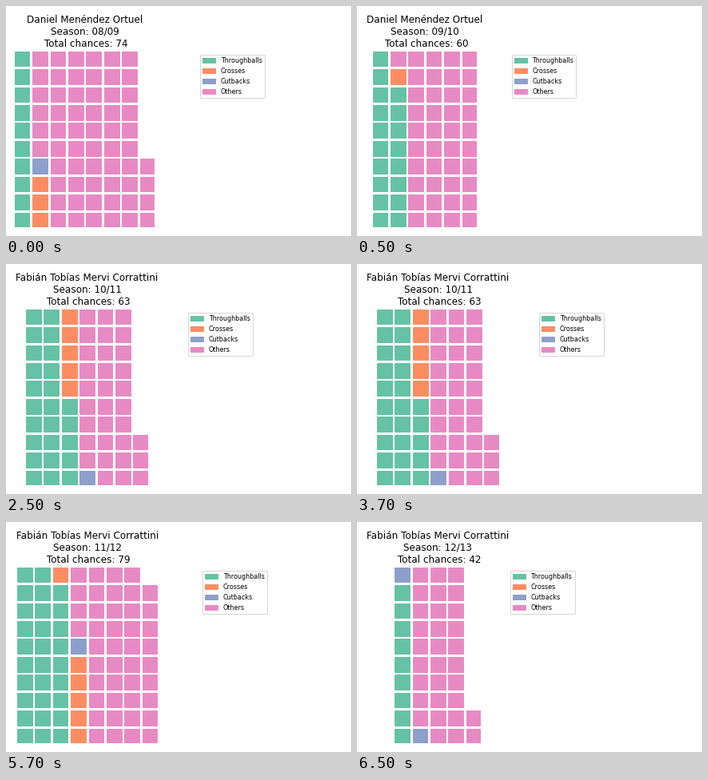
Recreate the animation shown at these times as a matplotlib script. Size 432x288 px, loop 8000 ms.

```python
import matplotlib.pyplot as plt
from matplotlib.animation import FuncAnimation
from matplotlib.patches import Patch, Rectangle

WIDTH, HEIGHT, DPI = 432, 288, 72
ROWS = 10
BLOCK = 18.678
PITCH = 1.2 * BLOCK
BOTTOM = 10.8

KINDS = ["Throughballs", "Crosses", "Cutbacks", "Others"]
COLORS = ["#66c2a5", "#fc8d62", "#8da0cb", "#e78ac3"]

FIRST = "Daniel Menéndez Ortuel"
SECOND = "Fabián Tobías Mervi Corrattini"

# player, season, chances of each kind, chart centre in px, steps on screen
SEASONS = [
    (FIRST, "08/09", (10, 3, 1, 60), 98.59, 1),
    (FIRST, "09/10", (18, 1, 0, 41), 84.91, 4),
    (SECOND, "10/11", (25, 5, 1, 32), 101.585, 4),
    (SECOND, "11/12", (29, 6, 1, 43), 101.745, 4),
    (SECOND, "12/13", (9, 0, 2, 31), 101.29, 3),
]
TIMELINE = [season for season in SEASONS for _ in range(season[-1])]

plt.rcParams["font.family"] = "DejaVu Sans"
fig = plt.figure(figsize=(WIDTH / DPI, HEIGHT / DPI), dpi=DPI, facecolor="white")


def span(count):
    """Length in px of a run of blocks with the gaps between them."""
    return (count - 1) * PITCH + BLOCK


def draw_waffle(ax, counts):
    colors = [c for c, n in zip(COLORS, counts) for _ in range(n)]
    for i, color in enumerate(colors):
        column, row = divmod(i, ROWS)
        ax.add_patch(Rectangle((column * PITCH, row * PITCH), BLOCK, BLOCK,
                               color=color, linewidth=1))


def draw(step):
    player, season, counts, center, _ = TIMELINE[step]
    total = sum(counts)
    width, height = span(-(-total // ROWS)), span(ROWS)

    fig.clear()
    ax = fig.add_axes([(center - width / 2) / WIDTH, BOTTOM / HEIGHT,
                       width / WIDTH, height / HEIGHT])
    ax.set(xlim=(0, width), ylim=(0, height))
    ax.axis("off")
    draw_waffle(ax, counts)
    ax.set_title(f"{player}\nSeason: {season}\n Total chances: {total}", fontsize=12)
    ax.legend(handles=[Patch(color=c, label=k) for c, k in zip(COLORS, KINDS)],
              loc="upper left", bbox_to_anchor=(1.3, 1), fontsize=8)


animation = FuncAnimation(fig, draw, frames=len(TIMELINE), interval=500,
                          repeat=True, repeat_delay=0)
plt.show()
```
